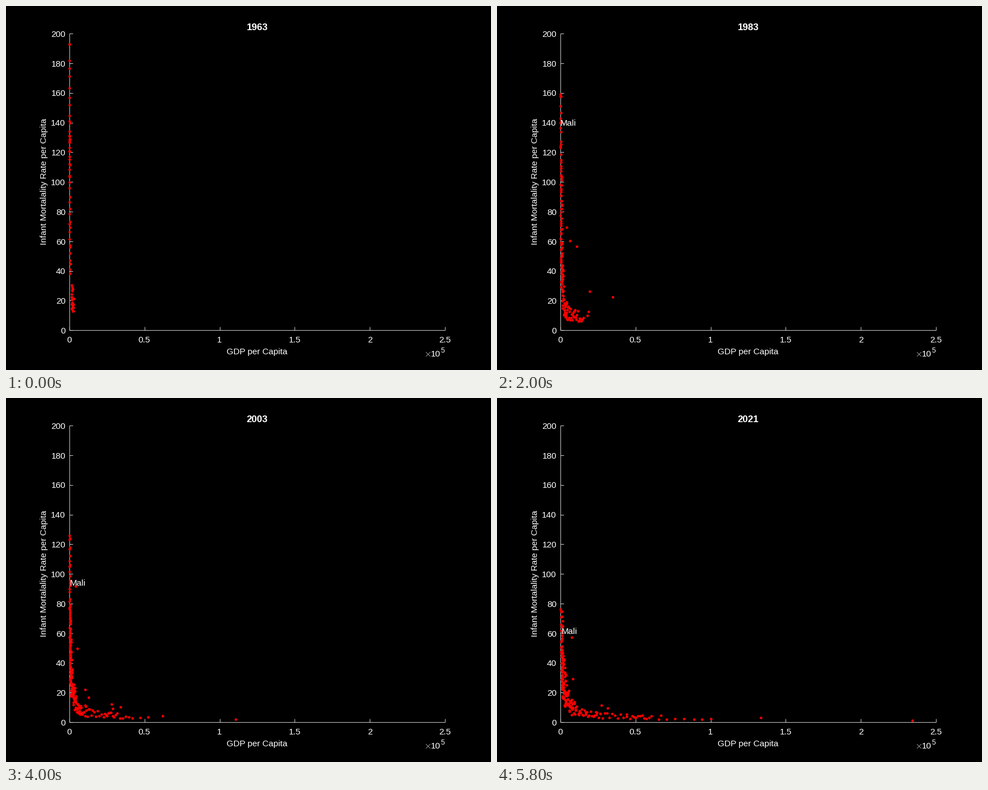
A matplotlib script for the animation above (5.9 s loop, 864 by 648 pixels).

```python
import numpy as np
import matplotlib.pyplot as plt
from matplotlib.animation import FuncAnimation

W, H, DPI = 864, 648, 100
PT = 72 / DPI                      # points per pixel
LEFT, RIGHT, TOP, BOTTOM = 112.7, 782.3, 49.2, 577.2
FIRST, LAST = 1963, 2021
RICH, POOR = 48, 132

plt.rcParams["font.family"] = "Liberation Sans"
rng = np.random.default_rng(5)


def px(gdp):
    """GDP per capita in thousands to pixels."""
    return LEFT + np.asarray(gdp) / 250 * (RIGHT - LEFT)


def py(rate):
    return BOTTOM - np.asarray(rate) / 200 * (BOTTOM - TOP)


# ---- data model -------------------------------------------------------
# Typical rich-country income, for the booms and dips between key years.
CYCLE = np.array([
    (1963, 1.5), (1970, 2.7), (1975, 6.4), (1980, 12), (1985, 9.2),
    (1987, 16), (1990, 21), (1992, 25), (1995, 28.5), (1997, 26),
    (2000, 22.5), (2003, 28), (2005, 32), (2008, 45.5), (2009, 40),
    (2012, 39.5), (2014, 42), (2015, 36.5), (2018, 42), (2020, 40),
    (2021, 47),
])


def cycle(year):
    return np.interp(year, CYCLE[:, 0], CYCLE[:, 1])


rank = np.arange(RICH)
u = (np.arange(POOR) + 0.5) / POOR
rich_noise = rng.uniform(-0.5, 0.5, RICH) * np.linspace(0.7, 1.1, RICH)
rich_noise[0] = -0.6
poor_noise = rng.uniform(-0.8, 0.8, POOR)
wobble = rng.uniform(0.985, 1.015, POOR)

years, gdps, rates = [], [], []


def key_year(year, octiles, income, power, tail, best, worst):
    """Poorer countries by rate octiles, richer ones by ranked income."""
    rate = np.interp(u, np.linspace(0, 1, 9), octiles) * wobble
    gdp = income * (rate / 50) ** -power * np.exp(poor_noise)
    top = np.exp(np.interp(rank, [0, 1, 2, 4, 9, 19, 33, 47], np.log(tail)))
    low = best * (worst / best) ** (rank / RICH) * np.exp(rich_noise)
    years.append(year)
    gdps.append(np.append(top, gdp))
    rates.append(np.append(low, rate))


key_year(1963, [197, 156, 133, 127, 115, 102, 74, 58, 37], .4, 1,
         [8, 3.1, 2.7, 2.6, 2.2, 1.7, .8, .5], 17, 29)
key_year(1970, [190, 149, 133, 118, 103, 95, 75, 59, 38], .5, 1.1,
         [12, 4.7, 4, 3.4, 2.7, 1.8, 1, .6], 13.5, 28)
key_year(1983, [163, 117, 97, 80, 61, 48, 38, 27, 14], .8, .9,
         [40, 18, 15.4, 13.8, 11.5, 8, 4, 2.5], 8, 14)
key_year(1992, [158, 104, 84, 64, 50, 42, 32, 21, 10], .7, 1.1,
         [88.8, 40.8, 39.6, 31.5, 25.5, 15, 6, 3], 5.5, 13)
key_year(1997, [146, 93, 73, 59, 42, 33, 26, 19, 10], .7, 1.35,
         [88.8, 46.4, 41.6, 35.6, 26.6, 16.5, 5.6, 3.5], 4.3, 10)
key_year(2008, [115, 71, 54, 44, 33, 25, 18, 14, 7], .85, 1.4,
         [203, 120.5, 97, 74, 56, 45.7, 21.4, 10], 2.8, 9)
key_year(2021, [78, 50, 39, 30, 22, 17, 13, 10, 5], 1, 1.2,
         [234.3, 133.5, 100, 89, 60.5, 46.5, 23, 12.4], 2.3, 7)

# Countries join as their records begin.
rich_born = rng.integers(FIRST, 1981, RICH)
rich_born[:23] = FIRST
rich_born[0] = 1985
order = np.arange(POOR) * 0.618034 % 1
poor_born = np.ceil(np.interp(order, [.35, .47, .72, 1],
                              [FIRST, 1970, 1983, 1991]))
born = np.concatenate([rich_born, poor_born])


def loner(start, gdp, rate):
    """A country far off the trend, known from the third key year on."""
    global born
    old = np.array(years[:2])
    gdp = np.append(gdp[0] * cycle(old) / cycle(years[2]), gdp)
    rate = np.append(rate[0] * 1.02 ** (years[2] - old), rate)
    for k in range(len(years)):
        gdps[k] = np.append(gdps[k], gdp[k])
        rates[k] = np.append(rates[k], rate[k])
    born = np.append(born, start)


loner(1965, [4.2, 5.3, 4.4, 9.6, 8.5], [69.4, 59, 56.3, 44, 29.3])
loner(1981, [.2, .3, 1, 19.7, 7.6], [123, 112, 100.5, 84.7, 57.3])
loner(1975, [34.7, 25.5, 28.5, 44.9, 44.2], [22.5, 13, 10.7, 8.2, 5.4])
loner(1968, [19.5, 16.2, 20.3, 55.8, 26.6], [26.3, 15.8, 14.8, 9.9, 5.8])
loner(1972, [11, 7.8, 8.4, 19.9, 27.4], [56.5, 31.5, 22.5, 21.7, 11.6])
loner(1970, [6.4, 7.4, 8, 28.9, 31.5], [60.4, 32.5, 20, 14.1, 9.7])
loner(1971, [18.6, 21, 20.6, 79.9, 67], [12.5, 8.6, 12.2, 8.4, 4.6])


def state(year):
    k = min(np.searchsorted(years, year, "right") - 1, len(years) - 2)
    ya, yb = years[k], years[k + 1]
    t = (year - ya) / (yb - ya)
    drift = cycle(year) / (cycle(ya) ** (1 - t) * cycle(yb) ** t)
    gdp = gdps[k] ** (1 - t) * gdps[k + 1] ** t * drift
    rate = rates[k] * (1 - t) + rates[k + 1] * t
    seen = born <= year
    return gdp[seen], rate[seen]


MALI_FROM = 1967
MALI_YEARS = [MALI_FROM] + years[1:]
MALI_GDP = [.06, .07, .18, .32, .26, .7, .88]
MALI_RATE = [193, 184.8, 140, 116.5, 108.5, 82.2, 61.5]

# ---- stage ------------------------------------------------------------
fig = plt.figure(figsize=(W / DPI, H / DPI), dpi=DPI, facecolor="black")
ax = fig.add_axes([0, 0, 1, 1])
ax.set_xlim(0, W)
ax.set_ylim(H, 0)
ax.axis("off")


def label(x, y, s, size=15.43, ha="center", **kw):
    return ax.text(x, y, s, color="white", fontsize=size * PT, ha=ha,
                   va="baseline", **kw)


def line(xs, ys, color="white", width=0.8):
    ax.plot(xs, ys, color=color, lw=width * PT, solid_capstyle="butt", zorder=1)


line([LEFT, LEFT], [TOP, BOTTOM])
line([LEFT, RIGHT], [BOTTOM, BOTTOM])
for v in range(0, 201, 20):
    line([LEFT, LEFT + 6.5], [py(v)] * 2)
    label(106, py(v) + 5.7, str(v), ha="right")
for v in range(0, 251, 50):
    line([px(v)] * 2, [BOTTOM, BOTTOM - 6.5])
    label(px(v), 599.2, f"{v / 100:g}")

label(447.3, 619.8, "GDP per Capita")
label(72.3, 312.3, "Infant Mortalality Rate per Capita", rotation=90,
      rotation_mode="anchor")
line([748, 756], [616, 624], "#b0b0b0")
line([748, 756], [624, 616], "#b0b0b0")
label(757, 624.5, "10", ha="left")
label(775, 617, "5", size=12.4, ha="left")

title = label(447.6, 42.6, "", size=16.97, weight="bold")
dots, = ax.plot([], [], "o", color="red", ms=4.6 * PT, mew=0, zorder=2)
mali = label(0, 0, "Mali", ha="left", zorder=3)


def draw(i):
    year = FIRST + i
    gdp, rate = state(year)
    mali.set_visible(year >= MALI_FROM)
    if year >= MALI_FROM:
        g = np.interp(year, MALI_YEARS, MALI_GDP)
        r = np.interp(year, MALI_YEARS, MALI_RATE)
        gdp, rate = np.append(gdp, g), np.append(rate, r)
        mali.set_position((px(g) - 0.6, py(r) + 5.6))
    dots.set_data(px(gdp), py(rate))
    title.set_text(str(year))
    return dots, title, mali


anim = FuncAnimation(fig, draw, frames=LAST - FIRST + 1, interval=100,
                     repeat=True, repeat_delay=0)
plt.show()
```
